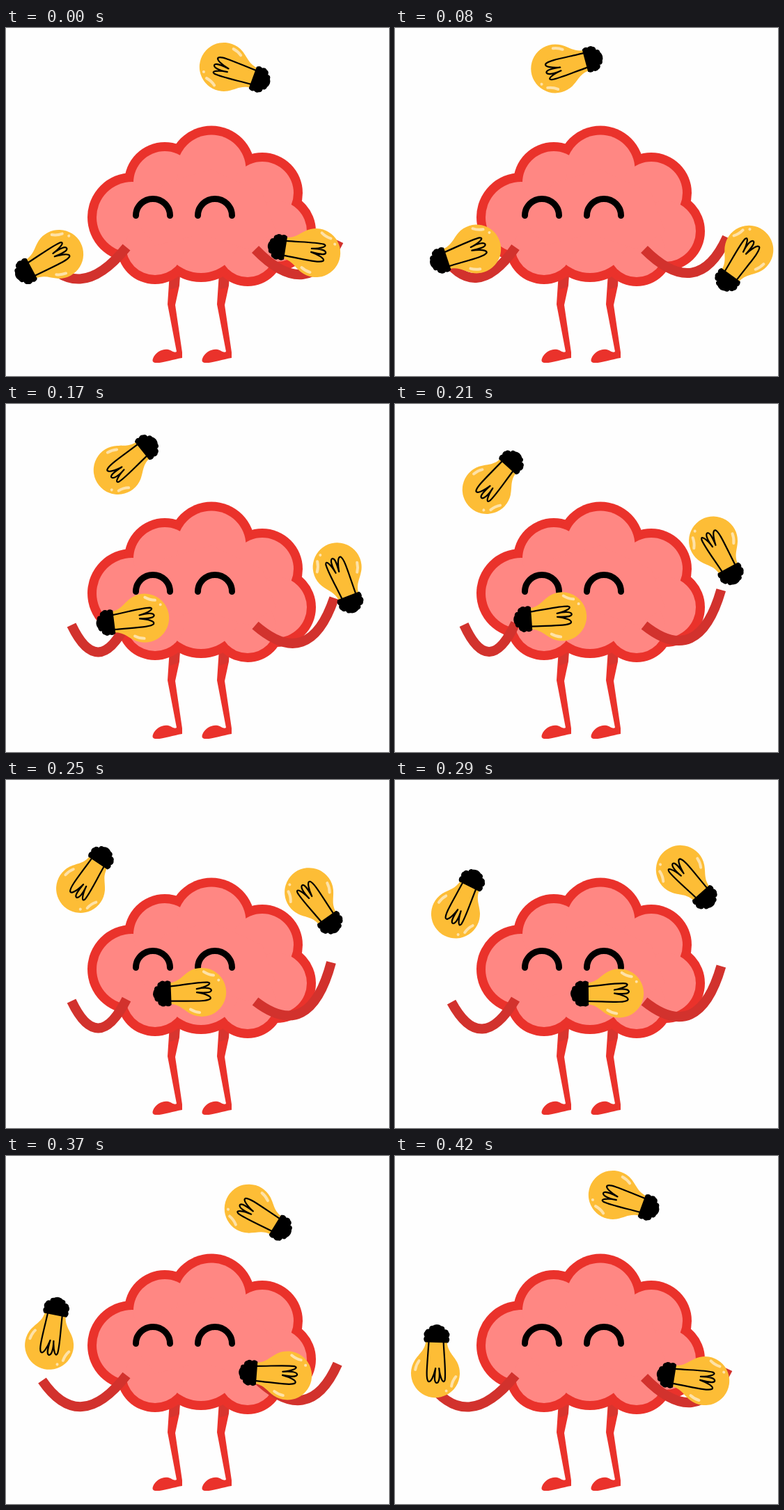
Animation of 550 by 500 pixels, one loop 0.46 s. Source, as an HTML page:

```html
<!DOCTYPE html>
<html lang="en">
<head>
<meta charset="utf-8">
<title>Juggling brain</title>
<style>
html, body { margin: 0; width: 100%; height: 100%; overflow: hidden; background: #fefefe; }
svg { display: block; width: 550px; height: 500px; }
</style>
</head>
<body>
<svg viewBox="0 0 550 500">
  <defs>
    <g id="leg">
      <path fill="#ea322b" d="M235 352L250 354L249 370L243 398L253 466V474C240 476 224 482 214 481Q209 480 211 475C215 464 228 459 236 463Q242 467 245 465L232 397Z"/>
      <path fill="#d8352f" d="M235 352H250L248 372L235 376Z"/>
    </g>
    <g id="bulb">
      <path fill="#fdbd36" d="M17 -30.5A35 35 0 1 0 17 30.5C28 24 32 16 47 15V-15C32 -16 28 -24 17 -30.5Z"/>
      <path fill="none" stroke="#000" stroke-width="2.2" stroke-linecap="round" stroke-linejoin="round"
        d="M46 10C22 12 2 15 -9 14C-17 12 -6 7 7 5C-5 7 -14 6 -14 2C-13 -2 -3 -1 7 0C-3 -2 -15 -6 -12 -10C-7 -14 12 -12 46 -11"/>
      <path fill="#000" stroke="#000" stroke-width="2" stroke-linejoin="round"
        d="M45 -16Q49 -19 52 -16Q56 -19 59 -16Q63 -15 62 -10Q67 -11 67 -6Q71 0 67 6Q67 11 62 10Q63 15 59 16Q56 19 52 16Q49 19 45 16Z"/>
      <g fill="none" stroke="#fee2a8" stroke-width="4" stroke-linecap="round">
        <path d="M-4 29.5A30 30 0 0 0 -18 23.7M17 -24A29.5 29.5 0 0 0 4 -29"/>
        <path d="M-25 16.5h.1"/>
      </g>
    </g>
  </defs>
  <use href="#leg"/>
  <use href="#leg" x="71"/>
  <g id="brain"></g>
  <path fill="none" stroke="#000" stroke-width="9" stroke-linecap="round"
    d="M186.5 269.5A24.5 24 0 0 1 235.5 269.5M275.5 269.5A24.5 24 0 0 1 324.5 269.5"/>
  <g fill="none" stroke="#d2322d" stroke-width="14">
    <path id="armL"/>
    <path id="armR"/>
  </g>
  <g id="bulbs"></g>
</svg>
<script>
const NS = "http://www.w3.org/2000/svg";
const $ = id => document.getElementById(id);

function add(parent, tag, attrs) {
  const el = document.createElementNS(NS, tag);
  for (const k in attrs) el.setAttribute(k, attrs[k]);
  return parent.appendChild(el);
}

// Lobes: centre x, centre y, outer radius
const lobes = [
  [181, 272, 64], [228, 222, 58], [295, 203, 62.5], [368, 237, 58],
  [388, 292, 57], [347, 318, 53], [280, 296, 69], [214, 313, 55]
];
const rim = 13;
for (const [fill, inset] of [["#ea322b", 0], ["#ff8783", rim]]) {
  for (const [cx, cy, r] of lobes) add($("brain"), "circle", { cx, cy, r: r - inset, fill });
  add($("brain"), "polygon", { points: lobes.map(l => l.slice(0, 2)).join(" "), fill });
}

// Bezier legs; each point is x, y, angle of the cap
const pass = [[76, 325, 152], [199, 300, 186], [322, 297, 172], [445, 323, 189]];
const swing = [[445, 323, 189], [490, 346, 177], [534, 335, 127], [491, 274, 78]];
const rise = [[491, 274, 78], [459, 180, 54], [401, 96, 51], [313, 56, 20]];
const fall = [[313, 56, 20], [166, 26, -50], [62, 179, -55], [58, 312, -88]];

const bezier = ([a, b, c, d], u) => a.map((v, i) =>
  v * (1 - u) ** 3 + 3 * u * (1 - u) ** 2 * b[i] + 3 * u * u * (1 - u) * c[i] + u ** 3 * d[i]);

const steps = 10, catchSteps = 3;
const routes = [
  s => bezier(pass, Math.max(s - 1, 0) / (steps - 1)),
  s => s < catchSteps
    ? bezier(swing, s / catchSteps)
    : bezier(rise, (s - catchSteps) / (steps - catchSteps)),
  s => bezier(fall, s / steps)
];
const bulbs = routes.map(() => add($("bulbs"), "use", { href: "#bulb" }));

// 24 pictures a second, rounded to 10 ms
const loop = 460;
const starts = Array.from({ length: steps + 1 }, (_, i) => 10 * Math.ceil(i * 25 / 6 - 0.5));

const wave = u => Math.sin(Math.PI * u) ** 2;
const arm = (id, hand, bend, shoulder) =>
  $(id).setAttribute("d", `M${hand}Q${bend} ${shoulder}`);

function draw(ms) {
  const t = ms % loop;
  const s = starts.filter(v => v <= t).length - 1;
  const l = wave(s / steps);
  const r = wave((s / steps) ** 1.36);
  arm("armL", [47 + 52 * l, 323 - 6 * l], [103 + 32 * l, 402 - 6 * l], [173, 315]);
  arm("armR", [478 - 11 * r, 306 - 44 * r], [434 + 2 * r, 396 - 18 * r], [358, 318]);
  routes.forEach((route, i) => {
    const [x, y, a] = route(s);
    bulbs[i].setAttribute("transform", `translate(${x} ${y}) rotate(${a})`);
  });
}

const t0 = performance.now();
function tick() {
  draw(performance.now() - t0);
  requestAnimationFrame(tick);
}
tick();
</script>
</body>
</html>
```
